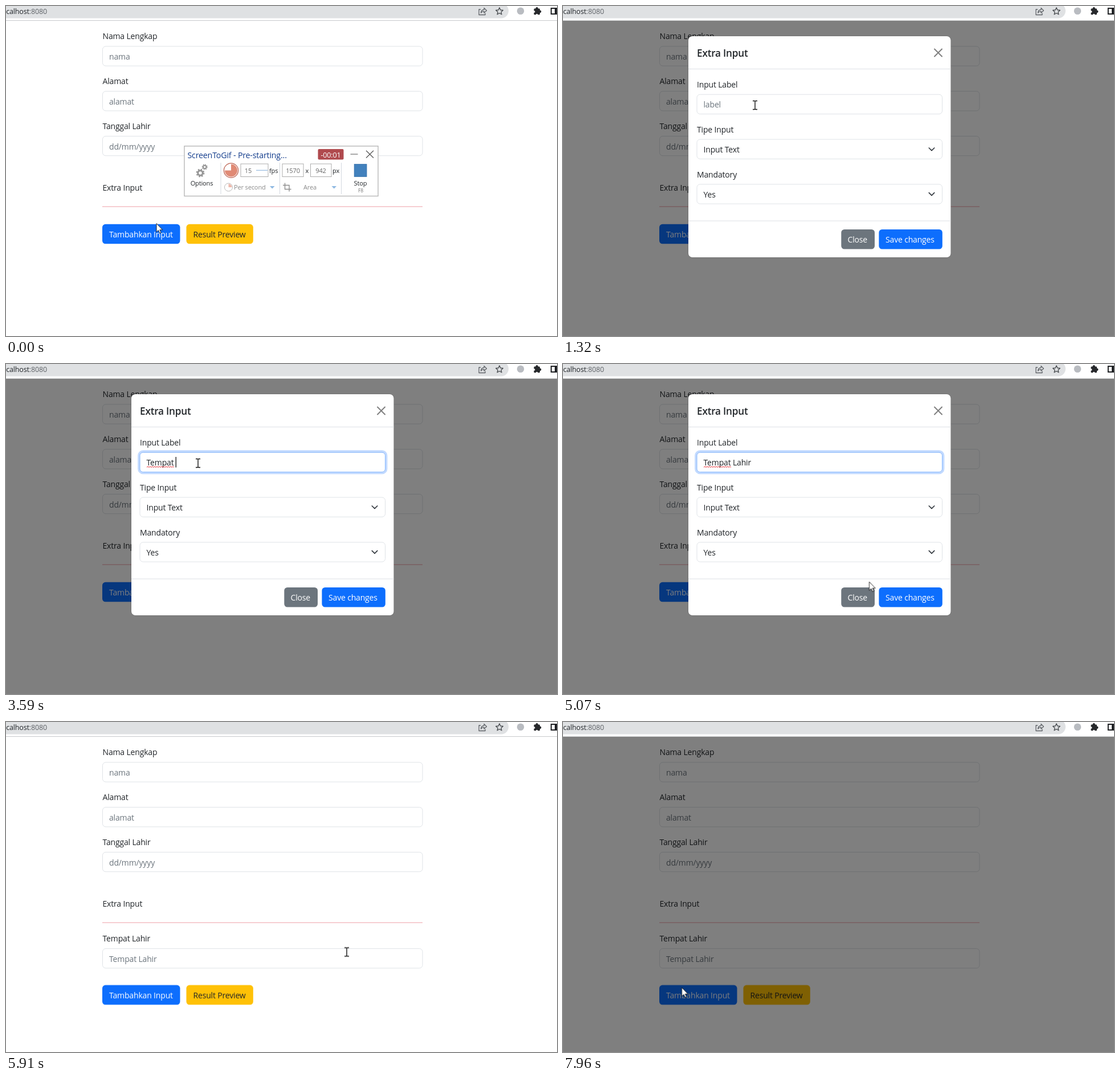
Recreate the animation shown at these times as an HTML page. Size 967 by 579 pixels, loop 8000 ms.

```html
<!DOCTYPE html>
<html lang="id">
<head>
<meta charset="utf-8">
<title>Extra input form</title>
<style>
html, body { margin: 0; width: 100%; height: 100%; overflow: hidden; background: #fff; }
svg { display: block; width: 967px; height: 579px; }
text { font: 14px "Open Sans", "Noto Sans", sans-serif; letter-spacing: -.012em; fill: #212529; white-space: pre; }
.hint { fill: #6c757d; }
.light { fill: #fff; }
.field { fill: #fff; stroke: #dfe3e7; rx: 5.5px; height: 34.3px; }
.page .field { width: 561.5px; }
.modal .field { width: 430.5px; }
.btn { rx: 5.5px; height: 34.5px; }
.title { font-size: 17.2px; font-weight: 600; }
.rule { fill: #dee2e6; }
.line { fill: none; stroke: #343a40; stroke-width: 1.7; stroke-linecap: round; stroke-linejoin: round; }
.url { font-size: 12.5px; text-anchor: end; }
.icon { fill: none; stroke: #5f6368; stroke-width: 1.3; stroke-linejoin: round; }

.rec text { font-size: 11px; }
.rec .head { font-size: 14.2px; fill: #123c8c; }
.rec .badge { font-size: 12.5px; fill: #fff; }
.rec .mid { text-anchor: middle; }
.rec .dim { fill: #8a8a8a; }
.rec .num { fill: #666; text-anchor: middle; }
.rec .tiny { font-size: 8.5px; fill: #777; text-anchor: middle; }
.box { fill: #fff; stroke: #adadad; }
.cog { fill: none; stroke: #969696; }

.rec, .new, .shift, .backdrop, .modal, .add, .save, .ring, .cursor, .cursor g {
  animation: 8s linear infinite;
}
.rec, .new, .shift, .cursor g { animation-timing-function: step-end; }
.rec { animation-name: rec; }
.new { animation-name: new; }
.shift { animation-name: shift; }
.backdrop { animation-name: backdrop; }
.modal { animation-name: modal-fade, modal-slide; }
.add { fill: #0d6efd; animation-name: add; }
.save { fill: #0d6efd; animation-name: save; }
.ring { animation-name: ring; }
.cursor { animation-name: path; animation-timing-function: ease-in-out; }
.cursor .arrow { animation-name: arrow; }
.cursor .hand { animation-name: hand; }
.cursor .beam { animation-name: beam; }

@keyframes rec { 0% { opacity: 1 } .875%, 100% { opacity: 0 } }
@keyframes new { 0% { opacity: 0 } 67.75%, 100% { opacity: 1 } }
@keyframes shift { 0% { transform: none } 67.75%, 100% { transform: translateY(78.8px) } }
@keyframes backdrop {
  0%, 7% { opacity: 0 } 8.875%, 71.875% { opacity: .5 }
  73.75%, 97% { opacity: 0 } 98.875%, 100% { opacity: .5 }
}
@keyframes modal-fade {
  0%, 9.5% { opacity: 0 } 11.375%, 68.125% { opacity: 1 } 70%, 100% { opacity: 0 }
}
@keyframes modal-slide {
  0%, 9.5% { transform: translateY(-50px); animation-timing-function: ease-out }
  13.25%, 68.125% { transform: none; animation-timing-function: ease-out }
  71.875%, 100% { transform: translateY(-50px) }
}
@keyframes add {
  0%, .875% { fill: #0d6efd } 2.625%, 5.125% { fill: #0b5ed7 } 7%, 7.75% { fill: #0a58ca }
  9.5%, 92.5% { fill: #0d6efd } 94.25%, 95.125% { fill: #0b5ed7 } 97%, 97.5% { fill: #0a58ca }
  99.4%, 100% { fill: #0d6efd }
}
@keyframes save {
  0%, 64.375% { fill: #0d6efd } 66.25%, 67% { fill: #0b5ed7 } 68.5%, 72% { fill: #0a58ca } 100% { fill: #0d6efd }
}
@keyframes ring {
  0%, 22.375% { opacity: 0 } 24.25%, 67.5% { opacity: 1 } 69.375%, 100% { opacity: 0 }
}
@keyframes path {
  0%, .875% { transform: translate(264px, 381.5px) }
  2.625%, 12.25% { transform: translate(259px, 387px) }
  14.75% { transform: translate(317px, 241px) }
  15.625% { transform: translate(339px, 175px) }
  16.5%, 56.2% { transform: translate(337px, 174px) }
  60.875%, 63.2% { transform: translate(537px, 382px) }
  66.25%, 73.9% { transform: translate(598px, 403.5px) }
  78.125%, 84% { transform: translate(446px, 417px) }
  94.25%, 100% { transform: translate(208.5px, 466px) }
}
@keyframes arrow {
  0% { opacity: 1 } 1.75% { opacity: 0 } 7.75% { opacity: 1 } 15.2% { opacity: 0 }
  57.6% { opacity: 1 } 64.6% { opacity: 0 } 71.875% { opacity: 1 } 73.75% { opacity: 0 }
  87.5% { opacity: 1 } 92.5% { opacity: 0 } 97.5%, 100% { opacity: 1 }
}
@keyframes hand {
  0% { opacity: 0 } 1.75% { opacity: 1 } 7.75% { opacity: 0 } 64.6% { opacity: 1 }
  71.875% { opacity: 0 } 92.5% { opacity: 1 } 97.5%, 100% { opacity: 0 }
}
@keyframes beam {
  0% { opacity: 0 } 15.2% { opacity: 1 } 57.6% { opacity: 0 }
  73.75% { opacity: 1 } 87.5%, 100% { opacity: 0 }
}
</style>
</head>
<body>
<svg viewBox="0 0 967 579">
  <defs>
    <pattern id="wave" width="4" height="3" patternUnits="userSpaceOnUse" x="247" y="179">
      <path d="M0 2.3L2 .7L4 2.3" fill="none" stroke="#e8252c"/>
    </pattern>
  </defs>

  <g class="page">
    <text x="169.5" y="58.3">Nama Lengkap</text>
    <rect class="field" x="169.5" y="70.8"/>
    <text class="hint" x="181" y="94">nama</text>
    <text x="169.5" y="137.1">Alamat</text>
    <rect class="field" x="169.5" y="149.6"/>
    <text class="hint" x="181" y="172.8">alamat</text>
    <text x="169.5" y="215.9">Tanggal Lahir</text>
    <rect class="field" x="169.5" y="228.4"/>
    <text class="hint" x="181" y="251.6">dd/mm/yyyy</text>
    <text x="169.5" y="324.4">Extra Input</text>
    <rect x="169" y="351.2" width="562" height="1.6" fill="#f5c2c7"/>
    <g class="new">
      <text x="169.5" y="385.3">Tempat Lahir</text>
      <rect class="field" x="169.5" y="397.6"/>
      <text class="hint" x="181" y="420.8">Tempat Lahir</text>
    </g>
    <g class="shift">
      <rect class="btn add" x="169" y="382.8" width="136.5"/>
      <text class="light" x="181" y="406">Tambahkan Input</text>
      <rect class="btn" x="316.5" y="382.8" width="117.3" fill="#ffc107"/>
      <text x="328.5" y="406">Result Preview</text>
    </g>
  </g>

  <rect class="backdrop" y="26" width="967" height="553"/>

  <g class="modal">
    <rect x="219.5" y="52.5" width="461.5" height="389" rx="7.5" fill-opacity=".2"/>
    <rect x="220" y="53" width="460.5" height="388" rx="7" fill="#fff"/>
    <text class="title" x="235" y="88.5">Extra Input</text>
    <path d="M652 75.5L665 88.5M665 75.5L652 88.5" class="line" style="stroke:#7f7f7f;stroke-width:2"/>
    <rect class="rule" x="220" y="110" width="460.5" height="1"/>
    <text x="235" y="143">Input Label</text>
    <rect class="field" x="235" y="155.2"/>
    <g class="ring">
      <rect x="233" y="153.2" width="434.5" height="38.3" rx="7.5" fill="none" stroke="#0d6efd" stroke-opacity=".25" stroke-width="3.7"/>
      <rect x="235" y="155.2" width="430.5" height="34.3" rx="5.5" fill="#fff" stroke="#86b7fe"/>
    </g>
    <text id="entry" x="246.5" y="178.4">label</text>
    <rect id="squiggle" x="247" y="179" width="48" height="3" fill="url(#wave)"/>
    <rect id="caret" y="163" width="1.2" height="18.5"/>
    <text x="235" y="221.7">Tipe Input</text>
    <rect class="field" x="235" y="234"/>
    <text x="246.5" y="257.2">Input Text</text>
    <path class="line" d="M642.3 249L647 253.7L651.7 249"/>
    <text x="235" y="300.5">Mandatory</text>
    <rect class="field" x="235" y="312.8"/>
    <text x="246.5" y="336">Yes</text>
    <path class="line" d="M642.3 327.7L647 332.4L651.7 327.7"/>
    <rect class="rule" x="220" y="376.5" width="460.5" height="1"/>
    <rect class="btn" x="488.3" y="392" width="58.7" fill="#6c757d"/>
    <text class="light" x="499.5" y="415.4">Close</text>
    <rect class="btn save" x="554.4" y="392" width="111.4"/>
    <text class="light" x="566" y="415.4">Save changes</text>
  </g>

  <g class="browser">
    <rect width="967" height="26" fill="#fff"/>
    <rect x="-20" y="-4.5" width="902" height="26" rx="13" fill="#dfe1e3"/>
    <rect y="25" width="967" height="1" fill="#c8cacc"/>
    <text class="url" x="72" y="13.5">calhost<tspan fill="#5f6368">:8080</tspan></text>
    <path class="icon" d="M833 6H830V15.5H841V12.5M833.5 12Q834 6.5 839 6.5V3.5L843.5 8L839 12V9.3Q835.5 9.3 833.5 12Z"/>
    <path class="icon" style="stroke:#43474b" d="M866 2.8L867.8 7L872.3 7.4L868.9 10.4L869.9 14.8L866 12.5L862.1 14.8L863.1 10.4L859.7 7.4L864.2 7Z"/>
    <circle cx="903" cy="8.8" r="6.3" fill="#b9bcc1"/>
    <g fill="#27292c">
      <rect x="926.5" y="4.5" width="10.5" height="10.8" rx="1.2"/>
      <circle cx="931.7" cy="4.3" r="2.2"/>
      <circle cx="937.2" cy="9.8" r="2.2"/>
    </g>
    <g fill="#fff"><circle cx="926.7" cy="10" r="1.8"/><circle cx="931.7" cy="15.5" r="1.8"/></g>
    <path d="M968 4H956.8V14H968" fill="none" stroke="#1f2124" stroke-width="2"/>
    <rect x="963" y="4" width="4" height="10" fill="#1f2124"/>
  </g>

  <g class="rec">
    <rect x="313" y="245.8" width="340" height="87.7" fill="#fff" stroke="#b2b2b2" stroke-width="1.3"/>
    <text class="head" x="318.5" y="266.5">ScreenToGif - Pre-starting...</text>
    <rect x="547.5" y="251" width="45" height="18.5" rx="2" fill="#b04a4e"/>
    <text class="badge mid" x="570" y="265.6">-00:01</text>
    <path d="M604.5 260H617.5M632 253.7L645 266.5M645 253.7L632 266.5" stroke="#555" stroke-width="1.2"/>
    <g class="cog">
      <circle cx="341" cy="293" r="4.2" stroke-width="3"/>
      <circle cx="341" cy="293" r="6.3" stroke-width="2.2" stroke-dasharray="2.5 2.45"/>
      <circle cx="348.7" cy="282.5" r="2.8" stroke-width="2"/>
      <circle cx="348.7" cy="282.5" r="4.3" stroke-width="1.6" stroke-dasharray="1.7 1.68"/>
    </g>
    <text class="mid" x="343.5" y="315" fill="#333">Options</text>
    <path d="M377 275V330M480.5 275V330M588.5 275V330" stroke="#d3d9e0"/>
    <circle cx="395" cy="288.5" r="12.6" fill="#fff" stroke="#bd6353" stroke-width="1.3"/>
    <path d="M395 288.5V277.5A11 11 0 1 1 384 288.5Z" fill="#e08a75"/>
    <rect class="box" x="412" y="277" width="48" height="22.5"/>
    <text class="num" x="425" y="293">15</text>
    <path d="M439 288.3H459" stroke="#9dbfe2" stroke-width="1.3"/>
    <text x="462" y="293">fps</text>
    <rect class="box" x="485" y="277" width="37" height="22.5"/>
    <text class="num" x="503.5" y="293">1570</text>
    <text class="mid" x="528.3" y="293">x</text>
    <rect class="box" x="534.5" y="277" width="36.5" height="22.5"/>
    <text class="num" x="552.5" y="293">942</text>
    <text x="573" y="293">px</text>
    <rect x="611.3" y="277.7" width="21.6" height="21.6" fill="#4281bd" stroke="#3672ac"/>
    <text class="mid" x="622" y="315">Stop</text>
    <text class="tiny" x="622.5" y="326.5">F8</text>
    <circle cx="390.5" cy="318" r="7" fill="#fff" stroke="#bbb"/>
    <path d="M390.5 318V312A6 6 0 0 1 396.5 318Z" fill="#edb9ac"/>
    <text class="dim" x="400" y="322.3">Per second</text>
    <path d="M463 316H471.5L467.2 320.5ZM571.5 316H580L575.7 320.5Z" fill="#8fb9e2"/>
    <path d="M489.5 310.5V321.5H500.5M486 314.5H497V325.5" fill="none" stroke="#8d8d8d" stroke-width="1.4"/>
    <text class="dim mid" x="533.5" y="322.3">Area</text>
  </g>

  <g class="cursor">
    <g class="arrow">
      <path d="M0 0V15.2L3.4 12L5.8 17.3L8.2 16.2L5.8 11.2H10.7Z" fill="#fff" stroke="#111" stroke-width=".9"/>
    </g>
    <g class="hand">
      <path d="M-1.5 1Q0 -1.2 1.5 1V6.5Q3.2 5.2 4.4 7Q6.2 6 7.2 7.8Q9.6 7 9.6 9.5V13Q9.4 15.5 8 17.5H0Q-2.5 13.5 -5 10.8Q-5.5 8 -3 9L-1.5 10.5Z" fill="#fff" stroke="#111" stroke-width=".9"/>
    </g>
    <g class="beam">
      <path d="M-4 -7.5H-1L0 -6.8L1 -7.5H4M0 -7V7M-4 7.5H-1L0 6.8L1 7.5H4" fill="none" stroke="#111" stroke-width="1.4"/>
    </g>
  </g>
</svg>
<script>
const $ = s => document.querySelector(s);
const entry = $('#entry'), caret = $('#caret'), squiggle = $('#squiggle');
const clock = $('.cursor').getAnimations()[0];
const label = 'Tempat Lahir';
// Time in ms of each key press
const keys = [2330, 2460, 2660, 2860, 2990, 3060, 3260, 3590, 3720, 3790, 3890, 3990];

const show = (el, on) => { el.style.visibility = on ? 'visible' : 'hidden'; };

function draw() {
  const t = (clock.currentTime || 0) % 8000;
  const count = keys.filter(k => k <= t).length;
  const value = count ? label.slice(0, count) : 'label';
  if (entry.textContent !== value) entry.textContent = value;
  entry.style.fill = count ? '#212529' : '#6c757d';
  const width = count ? entry.getComputedTextLength() : 0;
  caret.setAttribute('x', 246.5 + width - .3);
  show(caret, t >= 1790 && t < 5400 && !(t >= 4520 && t < 5065));
  show(squiggle, count > 6);
  requestAnimationFrame(draw);
}
draw();
</script>
</body>
</html>
```
